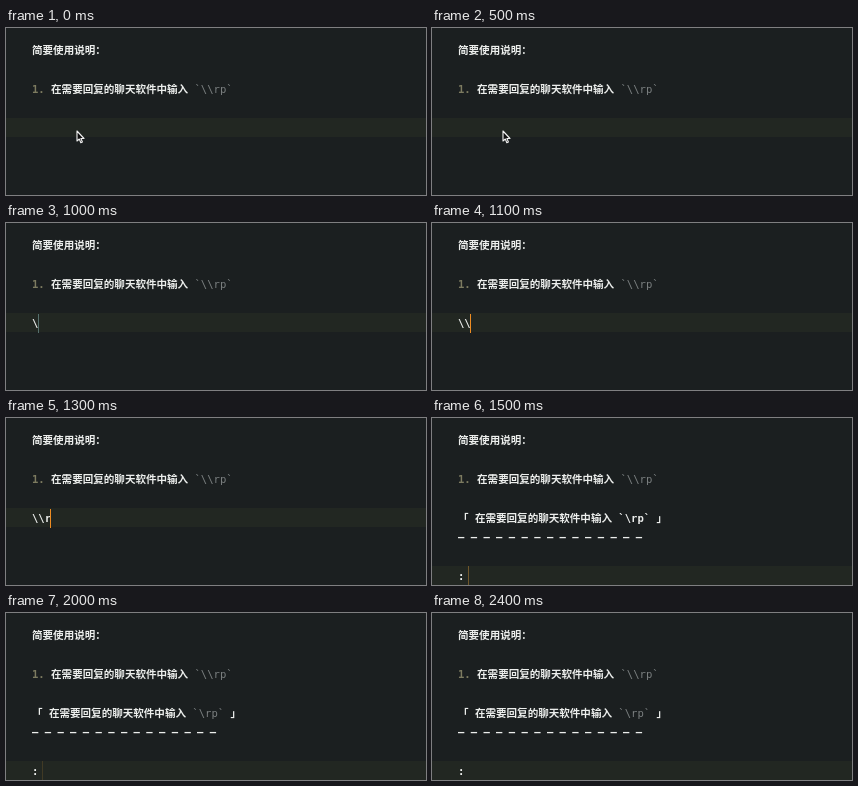
Animation, 420 px wide and 167 px high, one loop 2.5 s. Source, as an HTML page:

```html
<!DOCTYPE html>
<html lang="zh-CN">
<head>
<meta charset="utf-8">
<title>简要使用说明</title>
<style>
  html, body { margin: 0; width: 100%; height: 100%; overflow: hidden; background: #1b1f20; }
  .stage {
    position: relative; width: 420px; height: 167px; overflow: hidden;
    background: #1b1f20; color: #eceeec;
    font: bold 10.56px/19px "DejaVu Sans Mono", "Noto Sans CJK SC", "Noto Sans CJK", monospace;
  }
  .stage > * { position: absolute; }
  .line { position: absolute; left: 26px; top: calc(13px + var(--row) * 19.4px); white-space: pre; }
  .number { color: #7d7b60; }
  .code { color: #7c8081; font-weight: normal; }

  /* Every change is a hard cut on one 2500 ms clock. */
  .step { animation: 2500ms step-end infinite; }
  .active { left: 0; top: 90px; width: 420px; height: 19px; background: #222722; animation-name: active; }
  .typed { width: 0; overflow: hidden; animation-name: type; }
  .reply { visibility: hidden; animation-name: reply; }
  .late { animation-name: highlight; }
  .caret { left: 25px; top: 91px; width: 1px; height: 19px; background: #ee8c22; opacity: 0; animation-name: caret; }
  .pointer { left: 70px; top: 102px; width: 9px; height: 14px; animation-name: pointer; }

  @keyframes active {
    0% { transform: none; }
    60%, 100% { transform: translateY(58px); }
  }
  @keyframes type {
    0% { width: 0; }
    24% { width: 1ch; }
    44% { width: 2ch; }
    52% { width: 3ch; }
    60%, 100% { width: 0; }
  }
  @keyframes reply {
    0% { visibility: hidden; }
    60%, 100% { visibility: visible; }
  }
  @keyframes highlight {
    0% { color: #eceeec; font-weight: bold; }
    64%, 100% { color: #7c8081; font-weight: normal; }
  }
  @keyframes caret {
    0%, 20% { opacity: 0; transform: none; }
    24% { opacity: 1; transform: translateX(7px); }
    40% { opacity: 1; transform: translateX(7px); background: #56706d; }
    44% { opacity: 1; transform: translateX(13px); background: #ee8c22; }
    52% { opacity: 1; transform: translateX(19px); background: #ee8c22; }
    60% { opacity: 1; transform: translate(11px, 57px); background: #70572b; }
    80% { opacity: .4; transform: translate(11px, 57px); background: #70572b; }
    84%, 100% { opacity: 0; transform: translate(11px, 57px); background: #70572b; }
  }
  @keyframes pointer {
    0% { visibility: visible; transform: none; }
    24% { visibility: hidden; transform: none; }
    68% { visibility: visible; transform: translate(89px, 25px); }
    72%, 100% { visibility: hidden; transform: none; }
  }
</style>
</head>
<body>
<div class="stage">
  <div class="active step"></div>
  <div class="line" style="--row:0">简要使用说明：</div>
  <div class="line" style="--row:2"><span class="number">1.</span> 在需要回复的聊天软件中输入 <span class="code">`\\rp`</span></div>
  <div class="line typed step" style="--row:4">\\r</div>
  <div class="reply step">
    <div class="line" style="--row:4">「 在需要回复的聊天软件中输入 <span class="late step">`\rp`</span> 」</div>
    <div class="line" style="--row:5">– – – – – – – – – – – – – – –</div>
    <div class="line" style="--row:7">:</div>
  </div>
  <div class="caret step"></div>
  <svg class="pointer step" viewBox="0 0 9 14">
    <path d="M1 1V11L3.3 9L4.8 12.7L6.4 12L4.9 8.5H8Z" fill="#111" stroke="#f2f2f2" stroke-width="1.1" stroke-linejoin="round"/>
  </svg>
</div>
</body>
</html>
```
